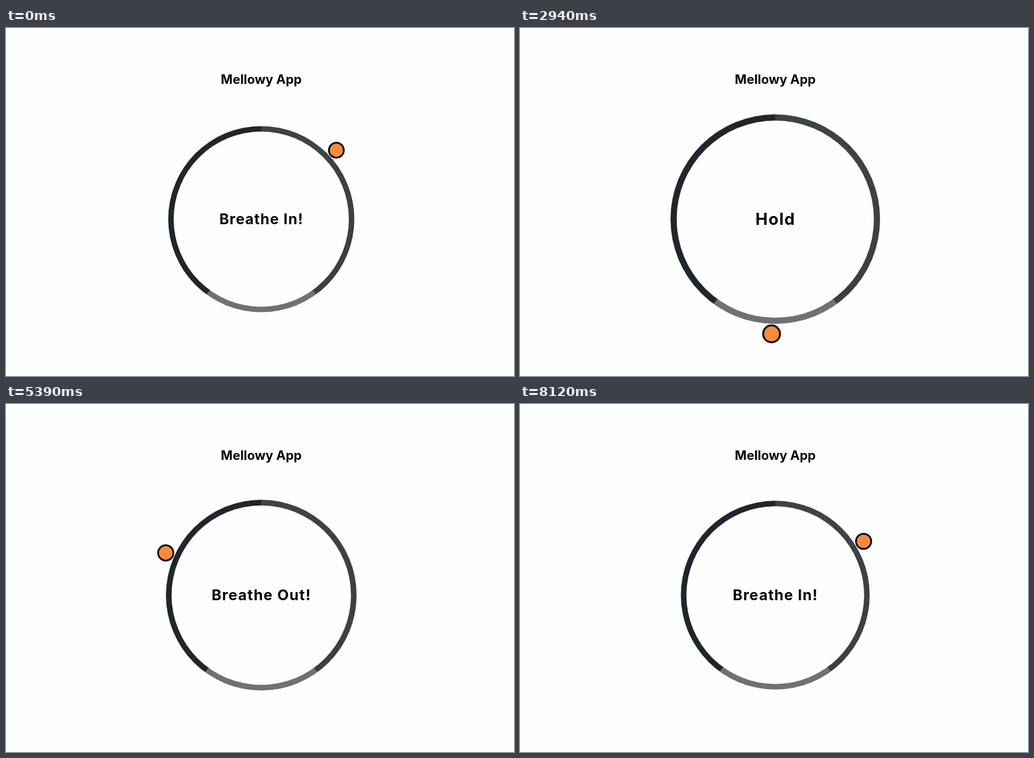
These frames come from a looping animation (800 by 548 pixels, 8.19 s). An HTML page with a canvas:

```html
<!DOCTYPE html>
<html lang="en">
<head>
<meta charset="utf-8">
<title>Breathing exercise</title>
<style>
  html, body { margin: 0; height: 100%; overflow: hidden; background: #fefefe; }
  canvas { display: block; }
</style>
</head>
<body>
<canvas id="stage" width="800" height="548"></canvas>
<script>
const ctx = document.getElementById('stage').getContext('2d');
const LOOP = 8190, STEP = 70;
const CYCLE = 7875, BREATHE = CYCLE * 0.4, HOLD = CYCLE * 0.2;
const START = 1038; // the loop opens partway through a breath
const CX = 402, CY = 301;

const ring = ctx.createConicGradient(-Math.PI / 2, 0, 0);
[[0, '#3f4347'], [0.4, '#3d3e45'], [0.4, '#707075'], [0.6, '#707075'],
 [0.6, '#20252c'], [1, '#23252d']].forEach(stop => ring.addColorStop(...stop));

function disc(x, y, r, fill) {
  ctx.fillStyle = fill;
  ctx.beginPath();
  ctx.arc(x, y, r, 0, Math.PI * 2);
  ctx.fill();
}

function label(text, x, y, size, spacing) {
  ctx.font = `700 ${size}px Inter, sans-serif`;
  ctx.letterSpacing = spacing + 'px';
  ctx.textAlign = 'center';
  ctx.fillStyle = '#050505';
  ctx.fillText(text, x + spacing / 2, y);
}

function breath(t) {
  if (t < BREATHE) return ['Breathe In!', 1 + 0.2 * t / BREATHE];
  if (t < BREATHE + HOLD) return ['Hold', 1.2];
  return ['Breathe Out!', 1.2 - 0.2 * (t - BREATHE - HOLD) / BREATHE];
}

function draw(time) {
  const t = (time + START) % CYCLE;
  const [text, scale] = breath(t);
  const angle = t / CYCLE * Math.PI * 2;

  ctx.fillStyle = '#fefefe';
  ctx.fillRect(0, 0, 800, 548);
  label('Mellowy App', CX, 87.5, 20, 0);

  ctx.save();
  ctx.translate(CX, CY);
  ctx.scale(scale, scale);
  disc(0, 0, 137.5, ring);
  disc(0, 0, 129.4, '#fefefe');
  label(text, -0.3, 7.3, 21.5, 0.95);

  const x = 150.6 * Math.sin(angle), y = -150.6 * Math.cos(angle);
  disc(x, y, 12.3, '#050505');
  disc(x, y, 9.8, '#f68b3e');
  ctx.restore();
}

const begin = performance.now();
function tick() {
  const time = (performance.now() - begin) % LOOP;
  draw(Math.floor(time / STEP) * STEP);
  requestAnimationFrame(tick);
}
tick();
</script>
</body>
</html>
```
